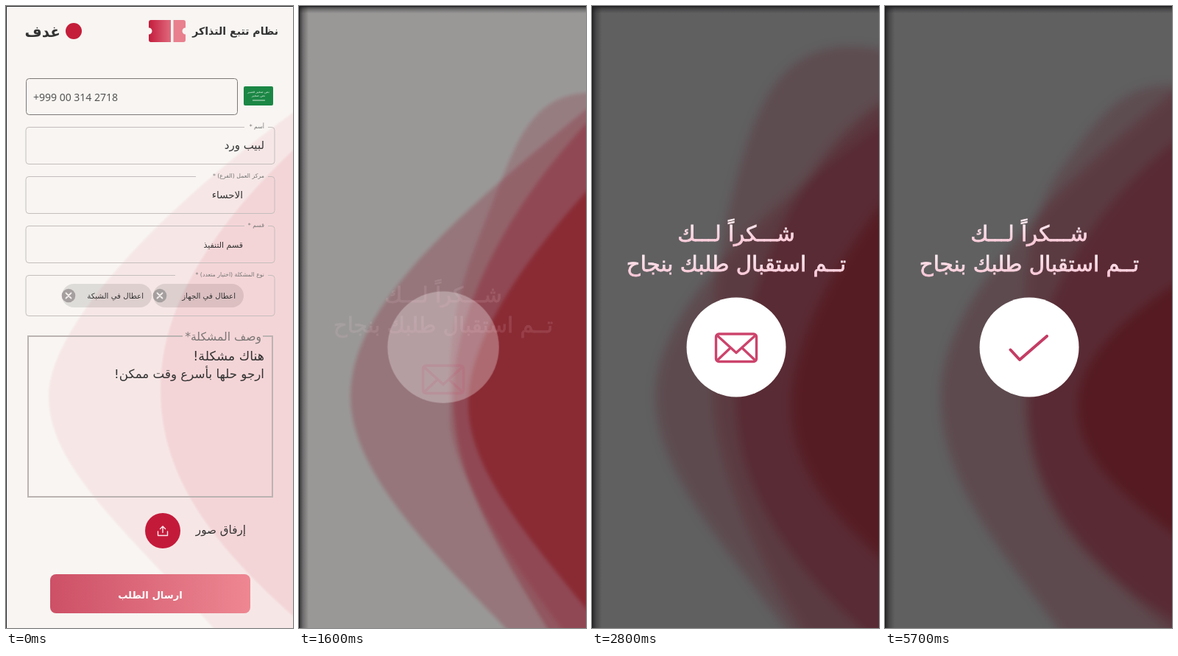
Recreate the animation shown at these times as an HTML page. Size 390 by 844 pixels, loop 5.8 s.

```html
<!DOCTYPE html>
<html lang="ar">
<head>
<meta charset="utf-8">
<title>نظام تتبع التذاكر</title>
<style>
html, body { margin: 0; width: 100%; height: 100%; overflow: hidden; background: #f8f5f2; }
svg { display: block; width: 100%; height: 100%; }
text { direction: rtl; font-family: "DejaVu Sans", sans-serif; fill: #333; }
.bold { font-weight: bold; }
.label { font-size: 7.8px; fill: #777; }
.chip { font-size: 10.2px; }
.frame { fill: none; stroke: #c4bebd; }
.line { fill: none; stroke-linecap: round; stroke-linejoin: round; }
.anim, .blob { animation: 5.8s linear infinite; }
.blob { fill: #dc1e3c; }

/* background shapes */
#blobs { animation-name: soften; }
@keyframes soften {
  0%, 24.14% { filter: blur(1px); }
  27.59% { filter: blur(2.5px); }
  37.93%, 100% { filter: blur(7px); }
}
#tall { animation-name: tall; }
@keyframes tall {
  0%, 24.14% { fill-opacity: 0; d: path("M460 135C320 100 305 190 255 300S208 480 208 560S320 800 400 900L460 920Z"); }
  27.59% { fill-opacity: .2; d: path("M460 125C310 90 300 180 250 300S205 480 205 560S320 800 400 900L460 920Z"); }
  37.93% { fill-opacity: .23; d: path("M460 100C300 50 270 120 225 260S190 460 190 530S300 800 400 900L460 920Z"); }
  60.34% { fill-opacity: .25; d: path("M460 50C270 -20 200 40 165 200S135 420 135 530S150 740 205 860L460 920Z"); }
  98.28%, 100% { fill-opacity: .23; d: path("M460 120C330 80 300 140 240 220S190 430 190 540S280 760 400 860L460 920Z"); }
}
#wide { animation-name: wide; }
@keyframes wide {
  0% { fill-opacity: .06; d: path("M440 110C260 230 58 420 58 530S200 740 330 900L460 920Z"); }
  24.14% { fill-opacity: .07; d: path("M440 110C260 230 67 420 67 530S200 740 340 910L460 920Z"); }
  27.59% { fill-opacity: .25; d: path("M440 100C230 270 70 400 70 530S250 800 350 920L460 920Z"); }
  37.93% { fill-opacity: .26; d: path("M440 130C220 290 75 420 75 530S240 790 350 920L460 920Z"); }
  60.34% { fill-opacity: .24; d: path("M440 130C250 240 100 400 100 530S190 740 230 860L460 920Z"); }
  98.28%, 100% { fill-opacity: .26; d: path("M440 80C230 240 76 400 76 530S180 760 245 860L460 920Z"); }
}
#inner { animation-name: inner; }
@keyframes inner {
  0% { fill-opacity: .088; d: path("M440 150C290 280 210 400 210 520S280 740 440 870L460 920Z"); }
  24.14% { fill-opacity: .11; d: path("M440 130C290 260 209 400 209 520S280 740 430 870L460 920Z"); }
  27.59% { fill-opacity: .32; d: path("M440 110C300 240 210 400 210 530S290 760 370 900L460 920Z"); }
  37.93% { fill-opacity: .25; d: path("M440 120C300 200 195 400 195 530S270 760 400 900L460 920Z"); }
  60.34% { fill-opacity: .46; d: path("M440 100C290 100 195 400 195 530S270 780 440 880L460 920Z"); }
  98.28%, 100% { fill-opacity: .36; d: path("M440 150C300 240 195 400 195 540S270 770 440 860L460 920Z"); }
}
#core { fill: #d4161f; animation-name: core; }
@keyframes core {
  0%, 24.14% { fill-opacity: 0; d: path("M440 210C330 320 235 440 235 540S330 740 440 880L460 920Z"); }
  27.59% { fill-opacity: .5; d: path("M440 200C330 310 230 440 230 540S330 740 440 880L460 920Z"); }
  37.93% { fill-opacity: .55; d: path("M440 190C340 300 250 460 250 550S320 700 440 790L460 920Z"); }
  60.34% { fill-opacity: .28; d: path("M440 250C350 330 295 440 295 530S340 700 440 790L460 920Z"); }
  98.28%, 100% { fill-opacity: .5; d: path("M440 350C350 400 262 470 262 540S310 660 440 750L460 920Z"); }
}

/* form leaves, shade comes in */
#form { animation-name: leave; }
@keyframes leave {
  0%, 20% { filter: blur(0); opacity: 1; }
  24.14% { filter: blur(5px); opacity: .95; }
  26.7%, 100% { filter: blur(8px); opacity: 0; }
}
#shade { fill: #000205; animation-name: shade; }
@keyframes shade {
  0%, 20% { opacity: 0; }
  24.14% { opacity: .32; }
  27.59% { opacity: .38; }
  36.2%, 100% { opacity: .61; }
}
#edge { animation-name: edge; }
@keyframes edge { 0%, 24.14% { opacity: 0; } 27.59%, 100% { opacity: 1; } }

/* confirmation */
#thanks { animation-name: thanks; }
#thanks text { fill: url(#blush); stroke: url(#blush); stroke-width: .8px; }
@keyframes thanks {
  0%, 25.86% { opacity: 0; transform: translateY(90px); }
  27.59% { opacity: .12; transform: translateY(83px); animation-timing-function: ease-out; }
  37.93% { opacity: 1; transform: translateY(5px); animation-timing-function: ease-out; }
  46.55%, 100% { opacity: 1; transform: none; }
}
#disc { transform-origin: 196px 463px; animation-name: disc; }
@keyframes disc {
  0%, 25.86% { opacity: 0; transform: scale(1.18); }
  27.59% { opacity: .3; transform: scale(1.122); animation-timing-function: ease-out; }
  36.2%, 100% { opacity: 1; transform: none; }
}
#mail { animation-name: mail; }
@keyframes mail {
  0%, 25.86% { opacity: 0; transform: translateY(48px); }
  27.59% { opacity: .12; transform: translateY(43px); animation-timing-function: ease-out; }
  36.2%, 48% { opacity: 1; transform: none; }
  56.9%, 100% { opacity: 0; transform: none; }
}
#ring { stroke-dasharray: 100 200; animation-name: ring; }
@keyframes ring {
  0%, 57.7% { stroke-dashoffset: 100; opacity: 0; }
  57.8% { stroke-dashoffset: 100; opacity: 1; }
  77.59%, 80% { stroke-dashoffset: 0; opacity: 1; }
  85%, 100% { stroke-dashoffset: 0; opacity: 0; }
}
#check { stroke-dasharray: 100 200; animation-name: check; }
@keyframes check {
  0%, 79.3% { stroke-dashoffset: 100; opacity: 0; }
  79.4% { stroke-dashoffset: 100; opacity: 1; animation-timing-function: ease-out; }
  88%, 100% { stroke-dashoffset: 0; opacity: 1; }
}
</style>
</head>
<body>
<svg viewBox="0 0 390 844">
  <defs>
    <linearGradient id="rose"><stop stop-color="#cd5066"/><stop offset="1" stop-color="#ee8792"/></linearGradient>
    <linearGradient id="ticket"><stop stop-color="#c41c3c"/><stop offset="1" stop-color="#df6a7d"/></linearGradient>
    <linearGradient id="blush" x2="0" y2="1"><stop stop-color="#fff0f4"/><stop offset="1" stop-color="#fbc6d6"/></linearGradient>
    <linearGradient id="side"><stop stop-color="#18181a" stop-opacity=".8"/><stop offset=".4" stop-color="#18181a" stop-opacity=".35"/><stop offset="1" stop-color="#18181a" stop-opacity="0"/></linearGradient>
    <linearGradient id="top" href="#side" x2="0" y2="1"/>
    <g id="close">
      <circle r="9.3" fill="#a5a09f"/>
      <path class="line" d="M-3.5-3.5l7 7m0-7l-7 7" stroke="#f3eeed" stroke-width="1.8"/>
    </g>
  </defs>

  <rect width="390" height="844" fill="#f8f5f2"/>
  <g id="blobs" class="anim">
    <path id="wide" class="blob"/>
    <path id="tall" class="blob"/>
    <path id="inner" class="blob"/>
    <path id="core" class="blob"/>
  </g>

  <g id="form" class="anim">
    <text class="bold" x="74" y="42" font-size="20">غدف</text>
    <circle cx="92" cy="34" r="11" fill="#c41e3a"/>
    <path d="M197 19h27v30h-27q-3 0-3-3v-7.500a4.500 4.500 0 0 0 0-9v-7.500q0-3 3-3z" fill="url(#ticket)"/>
    <path d="M227.500 19h13.500q3 0 3 3v7.500a4.500 4.500 0 0 0 0 9v7.500q0 3-3 3h-13.500z" fill="#e8808e"/>
    <text class="bold" x="370" y="39" font-size="14.100">نظام تتبع التذاكر</text>

    <rect x="27.5" y="98.500" width="287" height="49" rx="4" fill="none" stroke="#7c7877"/>
    <text x="37" y="129" font-size="14" style="direction:ltr;font-family:'Noto Sans',sans-serif;fill:#555">+999 00 314 2718</text>
    <rect x="323" y="109" width="40" height="26" rx="2" fill="#1b8745"/>
    <g text-anchor="middle" font-size="4.600">
      <text x="343" y="118" style="fill:#cfe6d6">نص صغير قصير</text>
      <text x="343" y="123" style="fill:#cfe6d6">نص صغير</text>
    </g>
    <path d="M335 128h17" stroke="#cfe6d6"/>

    <path class="frame" d="M356 164.500h5q4 0 4 4v42q0 4-4 4h-330q-4 0-4-4v-42q0-4 4-4H324"/>
    <text class="label" x="351" y="166">أسم *</text>
    <text x="351" y="194" font-size="15">لبيب ورد</text>

    <path class="frame" d="M356 231.500h5q4 0 4 4v42q0 4-4 4h-330q-4 0-4-4v-42q0-4 4-4H258"/>
    <text class="label" x="351" y="233">مركز العمل (الفرع) *</text>
    <text x="322" y="261" font-size="13.500">الاحساء</text>

    <path class="frame" d="M356 298.500h5q4 0 4 4v42q0 4-4 4h-330q-4 0-4-4v-42q0-4 4-4H324"/>
    <text class="label" x="351" y="300">قسم *</text>
    <text x="322" y="328" font-size="11">قسم التنفيذ</text>

    <path class="frame" d="M356 365.500h5q4 0 4 4v47q0 4-4 4h-330q-4 0-4-4v-47q0-4 4-4H230"/>
    <text class="label" x="351" y="367">نوع المشكلة (اختيار متعدد) *</text>
    <rect x="200" y="377" width="123" height="32" rx="16" fill-opacity=".1"/>
    <rect x="76" y="377" width="122" height="32" rx="16" fill-opacity=".1"/>
    <text class="chip" x="312" y="397">اعطال في الجهاز</text>
    <text class="chip" x="187" y="397">اعطال في الشبكة</text>
    <use href="#close" x="209" y="393"/>
    <use href="#close" x="85" y="393"/>

    <path class="frame" d="M349 448h13v218h-332v-218H240" stroke-width="2" style="stroke:#bbb3b2"/>
    <text x="347" y="454" font-size="15.600" style="fill:#7b7776">وصف المشكلة*</text>
    <text x="351" y="481" font-size="17.500">هناك مشكلة!</text>
    <text x="351" y="505" font-size="16.700">ارجو حلها بأسرع وقت ممكن!</text>

    <circle cx="213" cy="712" r="24" fill="#c41a3a"/>
    <path class="line" d="M206.500 713v5.500h13V713M213 714.500v-8m-3.500 3l3.500-3.500 3.500 3.500" stroke="#fbe9ec" stroke-width="1.400"/>
    <text x="326" y="716" font-size="15.200">إرفاق صور</text>
    <rect x="60" y="771" width="272" height="53" rx="8" fill="url(#rose)"/>
    <text class="bold" x="196" y="804" font-size="13.200" text-anchor="middle" style="fill:#fff">ارسال الطلب</text>
  </g>

  <rect id="shade" class="anim" width="390" height="844"/>
  <path d="M.5 844V.5H390" fill="none" stroke="#252528"/>
  <g id="edge" class="anim">
    <rect width="13" height="844" fill="url(#side)"/>
    <rect width="390" height="10" fill="url(#top)"/>
  </g>

  <g id="disc" class="anim">
    <circle cx="196" cy="463" r="67.500" fill="#fff"/>
  </g>
  <g id="mail" class="anim line" stroke="#cb3d66" stroke-width="3.400">
    <rect x="168.500" y="445" width="55" height="37.500" rx="4"/>
    <path d="M170 447l26 23.500 26-23.500M170 481l18-17M222 481l-18-17"/>
  </g>
  <circle id="ring" class="anim line" cx="196" cy="463" r="67.200" pathLength="100" transform="rotate(-85 196 463)" stroke="#f2a0ba" stroke-width="4"/>
  <path id="check" class="anim line" d="M170.500 466.500l12.500 13.500 37-32" pathLength="100" stroke="#c43c64" stroke-width="4"/>
  <g id="thanks" class="anim" text-anchor="middle" font-size="29.300">
    <text x="196" y="319">شـــكراً لـــك</text>
    <text x="196" y="360">تــم استقبال طلبك بنجاح</text>
  </g>
</svg>
</body>
</html>
```
